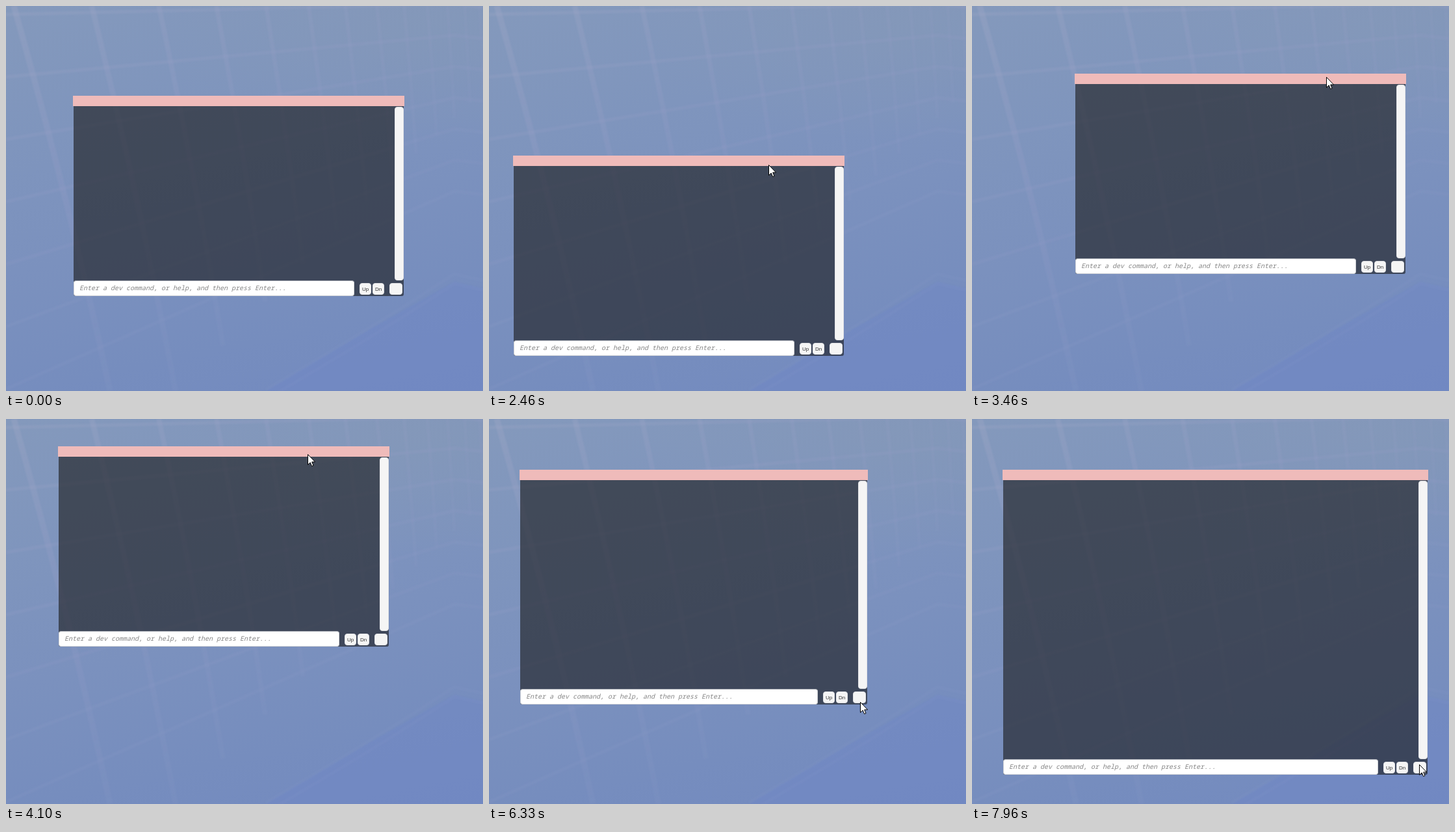
An HTML page for the animation above (8000 ms loop, 734 by 592 pixels).

```html
<!DOCTYPE html>
<html lang="en">
<head>
<meta charset="utf-8">
<title>Dev console</title>
<style>
  html, body { margin: 0; width: 100%; height: 100%; overflow: hidden; }
  #stage {
    position: relative; width: 734px; height: 592px; overflow: hidden;
    background:
      radial-gradient(ellipse 420px 190px at 640px 20px, rgba(134,153,183,.6), rgba(134,153,183,0)),
      linear-gradient(168deg, #8499bc, #7f95bd 28%, #7b91be 55%, #768dbe 80%, #738ac0);
  }
  #stage > svg { position: absolute; left: 0; top: 0; }
  #win, #win div { position: absolute; box-sizing: border-box; }
  #win { left: 0; top: 0; }
  .title { left: 0; right: 0; top: 0; height: 16px; background: #efbbba; }
  .body { left: 1px; right: 1px; top: 16px; bottom: 0; background: rgba(24,24,24,.6); border-radius: 0 0 3px 3px; }
  .bar, .btn { background: #f5f5f5; border: 1px solid #e2e3e6; border-radius: 4px; }
  .bar { right: 1px; top: 17px; bottom: 24px; width: 14px; }
  .btn { bottom: 2px; width: 18px; height: 18px; text-align: center;
    font: 8px/17px "Liberation Sans", Arial, sans-serif; color: #323232; }
  .field { left: 1px; right: 77px; bottom: 0; height: 24px; padding-left: 8px;
    background: #fff; border: 1px solid #d0d2d6; border-top-color: #a9adb5; border-radius: 4px;
    font: italic 10px/21px "Noto Sans Mono", monospace; color: #858585; white-space: pre; overflow: hidden; }
</style>
</head>
<body>
<div id="stage">
  <svg width="734" height="592">
    <defs>
      <linearGradient id="fade" gradientUnits="userSpaceOnUse" x1="0" y1="0" x2="260" y2="592">
        <stop offset="0" stop-color="#a0a8c6" stop-opacity=".34"/>
        <stop offset=".5" stop-color="#989cc8" stop-opacity=".22"/>
        <stop offset="1" stop-color="#8f9cc8" stop-opacity=".12"/>
      </linearGradient>
      <filter id="soft" x="-5%" y="-5%" width="110%" height="110%"><feGaussianBlur stdDeviation="1.2"/></filter>
    </defs>
    <path d="M400 592L560 497 690 424 734 434V592Z" fill="#6f87c6" opacity=".45" filter="url(#soft)"/>
    <g id="grid" fill="none" stroke="url(#fade)" filter="url(#soft)"></g>
  </svg>
  <div id="win">
    <div class="body"></div>
    <div class="title"></div>
    <div class="bar"></div>
    <div class="field">Enter a dev command, or help, and then press Enter...</div>
    <div class="btn" style="right:51px">Up</div>
    <div class="btn" style="right:31px">Dn</div>
    <div class="btn" style="right:3px;width:20px"></div>
  </div>
  <svg id="cursor" width="14" height="21">
    <path d="M.5 .5V16.3L4.2 12.9 6.6 18.5 9 17.5 6.7 12H11.6Z" fill="#fff" stroke="#000"/>
  </svg>
</div>
<script>
const $ = id => document.getElementById(id);

// Wall grid in perspective: uprights crowd, shorten and fade to the right
function line(d, width, opacity) {
  const p = document.createElementNS("http://www.w3.org/2000/svg", "path");
  p.setAttribute("d", d);
  p.setAttribute("stroke-width", width);
  p.setAttribute("stroke-opacity", opacity);
  $("grid").append(p);
}
for (let i = 0; i < 13; i++) {
  const x = 12 + 857 * (1 - .86 ** i), far = .87 ** i;
  const h = Math.min(592, 690 * far), lean = .25 * far * h;
  line(`M${x} 0Q${x + lean * .57} ${h / 2} ${x + lean} ${h}`, 2.5 + 6.5 * far, .94 ** i);
}
for (let i = 0; i < 7; i++) {
  const corner = 48 * i - 3;
  line(`M0 ${13 + 96 * i}L690 ${corner}L734 ${corner + 5}`, 5, .75);
}
for (const y of [412, 427]) line(`M400 ${y + 178}Q560 ${y + 85} 690 ${y}L734 ${y + 10}`, 4, .8);

// Pointer track: time, x, y
const track = [
  [500, 724, 168], [1130, 515, 141], [1330, 492, 148], [1530, 492, 148],
  [2340, 420, 230], [2430, 426, 240], [2600, 460, 260], [3030, 540, 215],
  [3230, 556, 148], [4060, 469, 52], [4330, 436, 88], [4500, 436, 88],
  [4900, 591, 300], [5200, 548, 379], [5470, 543, 376], [5800, 543, 376],
  [6860, 619, 513], [7560, 670, 550], [7930, 688, 537], [8000, 688, 524]
];
const last = track.length - 1;
const clamp = (v, a, b) => Math.min(b, Math.max(a, v));
const slope = (i, k) => (track[i + 1][k] - track[i][k]) / (track[i + 1][0] - track[i][0]);
// Flat at turning points, so the curve never overshoots
function tangent(i, k) {
  if (i === 0 || i === last) return 0;
  const a = slope(i - 1, k), b = slope(i, k);
  return a * b > 0 ? 2 * a * b / (a + b) : 0;
}
function pointer(time) {
  const t = clamp(time, track[0][0], track[last][0] - 1);
  const i = track.findIndex(p => p[0] > t) - 1;
  const span = track[i + 1][0] - track[i][0], u = (t - track[i][0]) / span, v = 1 - u;
  return [1, 2].map(k =>
    track[i][k] * v * v * (1 + 2 * u) + track[i + 1][k] * u * u * (3 - 2 * u) +
    span * u * v * (tangent(i, k) * v - tangent(i + 1, k) * u));
}

const LOOP = 8000, TICKS = 240;
const DRAG = [1530, 4330], RESIZE = [5800, LOOP];
const tickTime = n => Math.floor(n * 10 / 3) * 10;
const px = n => Math.round(n) + "px";
const win = $("win"), cursor = $("cursor");

function draw(now) {
  // The window trails the pointer by one tick
  const n = Math.floor((now % LOOP + 7) * TICKS / LOOP) % TICKS;
  const t = tickTime(n), late = tickTime(n - 1);
  const [cx, cy] = pointer(t);
  const [gx, gy] = pointer(clamp(late, ...DRAG));
  const [rx, ry] = pointer(clamp(late, ...RESIZE));
  cursor.style.visibility = t >= 500 ? "visible" : "hidden";
  cursor.style.transform = `translate(${px(cx)},${px(cy)})`;
  win.style.transform = `translate(${px(gx - 389)},${px(gy - 10)})`;
  win.style.width = px(510 + rx - 543);
  win.style.height = px(308 + ry - 376);
}
const start = performance.now();
function frame() {
  draw(performance.now() - start);
  requestAnimationFrame(frame);
}
frame();
</script>
</body>
</html>
```
